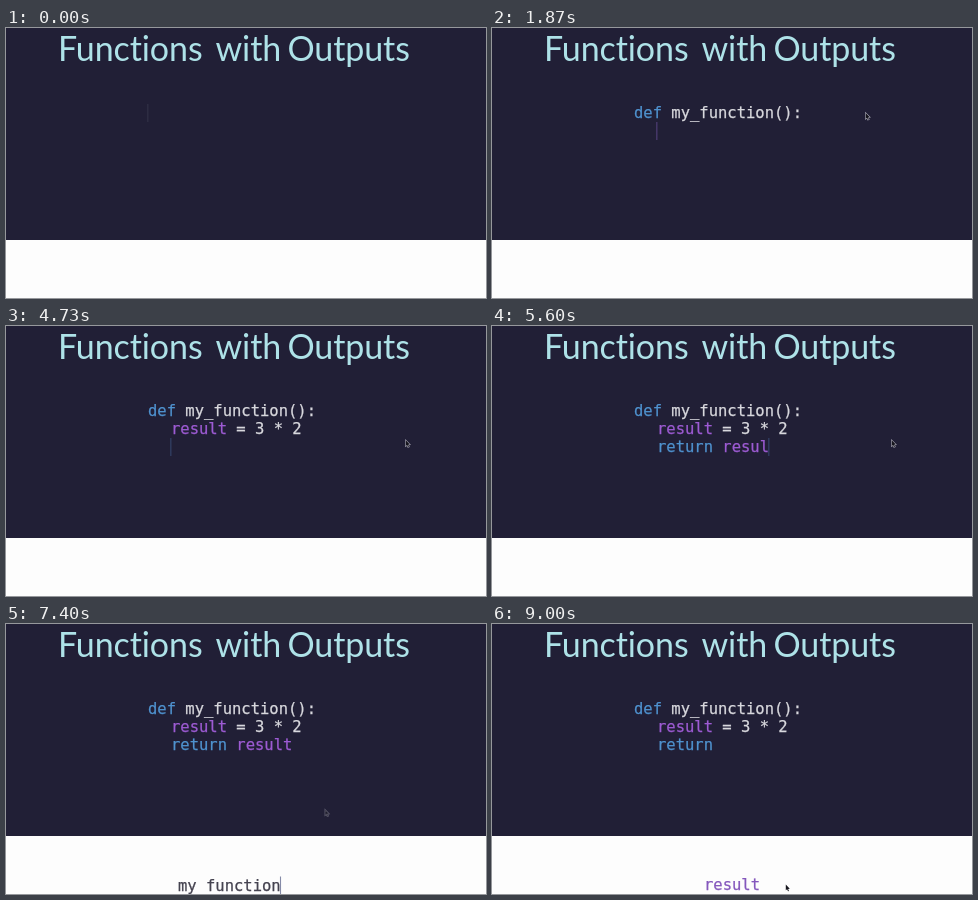
An HTML page with a canvas for the animation above (9340 ms loop, 480 px wide and 270 px high).

```html
<!DOCTYPE html>
<html lang="en">
<head>
<meta charset="utf-8">
<title>Functions with Outputs</title>
<style>
html, body { margin: 0; width: 100%; height: 100%; overflow: hidden; background: #211f36; }
canvas { display: block; width: 480px; height: 270px; }
</style>
</head>
<body>
<canvas id="stage"></canvas>
<script>
const LOOP = 9340;
const CHAR_MS = 67;
const SIZE = 15.5;
const MONO = `${SIZE}px "DejaVu Sans Mono", monospace`;
const BLUE = '#4f92cf', PURPLE = '#9d5bd3', PALE = '#d8d8dd', INK = '#454350';

// Each line shows its caret at `start` and begins typing one beat later.
const lines = [
  { x: 142, y: 90, start: 0, caret: '#343248', parts: [['def', BLUE], [' my_function():', PALE]] },
  { x: 165, y: 108, start: 1865, caret: '#54407c', parts: [['result', PURPLE], [' = 3 * 2', PALE]] },
  { x: 165, y: 126, start: 4725, caret: '#35456c', parts: [['return ', BLUE], ['result', PURPLE]] },
  { x: 172, y: 266.5, start: 6595, caret: '#858ba8', parts: [['my_function()', INK]] }
];
const MOVE = { start: 8430, end: 8970, x: 212, y: 266 };
const pointers = [
  { from: 1865, to: 3270, path: () => [373.7, 85] },
  { from: 4725, to: 6070, path: () => [399.8, 114.3] },
  { from: 6325, to: 7530, path: t => mix([348.4, 130], [319.1, 185.6], ease(t, 6325, 6600)) },
  { from: 8265, to: LOOP + 400, path: t => mix([202.6, 231.5], [293.8, 260.5], ease(t, 8430, 8950)) }
];

const canvas = document.getElementById('stage');
const ctx = canvas.getContext('2d');
const ratio = window.devicePixelRatio || 1;
canvas.width = 480 * ratio;
canvas.height = 270 * ratio;
ctx.scale(ratio, ratio);

const clamp = v => Math.max(0, Math.min(1, v));
const mix = (a, b, k) => a.map((v, i) => v + (b[i] - v) * k);

function ease(t, from, to) {
  const k = clamp((t - from) / (to - from));
  return k * k * (3 - 2 * k);
}

function text(str, x, y, color) {
  ctx.fillStyle = color;
  ctx.fillText(str, x, y);
}

// Code is set slightly heavier than the regular weight.
function code(str, x, y, color) {
  text(str, x, y, color);
  ctx.strokeStyle = color;
  ctx.lineWidth = 0.25;
  ctx.strokeText(str, x, y);
}

function drawTitle() {
  ctx.font = '34px Lato, sans-serif';
  ctx.letterSpacing = '-0.1px'; // also turns ligatures off
  const words = [['Functions', 52], ['with', 209.5], ['Outputs', 281.5]];
  words.forEach(([word, x]) => text(word, x, 33, '#aee2e8'));
  ctx.letterSpacing = '0px';
}

function drawLine(line, t) {
  if (t < line.start) return;
  const total = line.parts.reduce((n, [str]) => n + str.length, 0);
  const typed = Math.max(0, Math.floor((t - line.start - 63) / CHAR_MS));
  const step = ctx.measureText('m').width;
  let at = 0;
  for (const [str, color] of line.parts) {
    const shown = str.slice(0, Math.max(0, typed - at));
    code(shown, line.x + at * step, line.y, color);
    at += str.length;
  }
  if (typed < total) {
    ctx.fillStyle = line.caret;
    ctx.fillRect(line.x - 0.7 + typed * step, line.y - 14, 1.1, 18);
  }
}

function drawCode(t) {
  ctx.font = MONO;
  const moving = t >= MOVE.start;
  const k = ease(t, MOVE.start, MOVE.end);
  lines.forEach((line, i) => {
    if (moving && i === 2) {
      code('return', line.x, line.y, BLUE);
    } else if (moving && i === 3) {
      ctx.globalAlpha = 1 - k;
      drawLine(line, t);
      ctx.globalAlpha = 1;
    } else {
      drawLine(line, t);
    }
  });
  if (moving) {
    const home = [lines[2].x + ctx.measureText('return ').width, lines[2].y];
    const [x, y] = mix(home, [MOVE.x, MOVE.y], k);
    code('result', x, y, y > 215 ? '#8558bd' : PURPLE);
  }
}

function drawPointer(p, t) {
  if (t < p.from || t >= p.to) return;
  const [x, y] = p.path(t);
  ctx.save();
  ctx.globalAlpha = clamp((p.to - t) / 300);
  ctx.translate(x, y);
  ctx.beginPath();
  ctx.moveTo(0, 0);
  [[0, 5.8], [1.3, 4.7], [2.2, 6.8], [3.2, 6.4], [2.3, 4.4], [4, 4.2]]
    .forEach(([px, py]) => ctx.lineTo(px, py));
  ctx.closePath();
  ctx.lineWidth = 1.1;
  ctx.strokeStyle = '#b4b3be';
  if (y > 212) ctx.strokeStyle = '#fdfdfd';
  ctx.stroke();
  ctx.fillStyle = '#16151d';
  ctx.fill();
  ctx.restore();
}

function draw(t) {
  ctx.fillStyle = '#211f36';
  ctx.fillRect(0, 0, 480, 270);
  ctx.fillStyle = '#fdfdfd';
  ctx.fillRect(0, 212, 480, 58);
  drawTitle();
  drawCode(t);
  pointers.forEach(p => drawPointer(p, t));
}

const origin = performance.now();
function tick() {
  draw((performance.now() - origin) % LOOP);
  requestAnimationFrame(tick);
}
tick();
</script>
</body>
</html>
```
